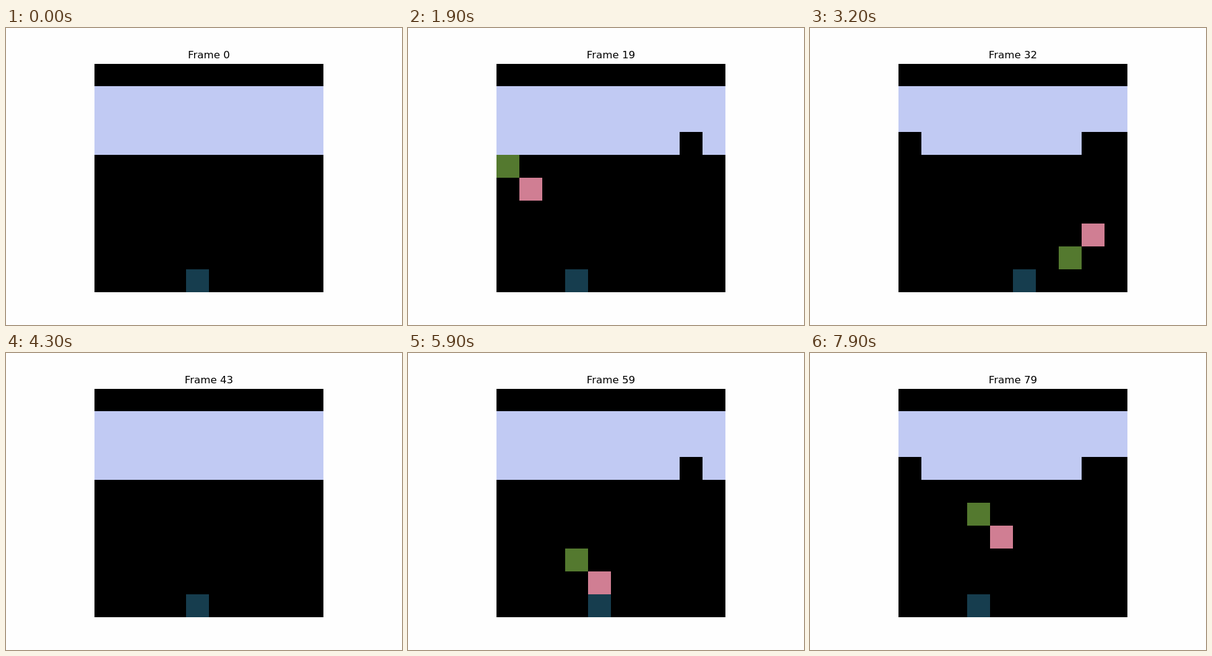
An HTML page that plays this animation: 640x480 px, repeating every 8000 ms.

```html
<!DOCTYPE html>
<html lang="en">
<head>
<meta charset="utf-8">
<title>Brick game</title>
<style>
  html, body { margin: 0; width: 100%; height: 100%; overflow: hidden; background: #fefefe; }
  svg { display: block; width: 640px; height: 480px; }
  text { font: 16.667px "DejaVu Sans", sans-serif; text-anchor: middle; }
</style>
</head>
<body>
<svg viewBox="0 0 640 480" shape-rendering="crispEdges">
  <text id="title" x="328" y="49">Frame 0</text>
  <rect x="143" y="58" width="370" height="369"/>
  <g id="board"></g>
</svg>
<script>
  const SIZE = 10, CELL = 37, LEFT = 143, TOP = 57;
  const STEP_MS = 100, FRAMES = 80;
  const COLORS = { paddle: '#163d4e', ball: '#54792f', trail: '#d07e93', brick: '#c1caf3' };
  // Paddle column at each step of a round.
  const PADDLE = '4444556665555444443333334432233456543333333';
  const title = document.getElementById('title');
  const board = document.getElementById('board');

  function playRound() {
    const bricks = new Set();
    for (let i = SIZE; i < 4 * SIZE; i++) bricks.add(i);
    let x = 0, y = 3, dx = 1, dy = 1;
    const states = [{ paddle: +PADDLE[0], ball: [x, y], trail: [x, y], bricks: [...bricks] }];

    for (let step = 1; step < PADDLE.length; step++) {
      const paddle = +PADDLE[step], trail = [x, y];
      let nx = x + dx, ny = y + dy;
      if (nx < 0 || nx >= SIZE) {
        nx = x;
        dx = -dx;
      }
      if (bricks.delete(ny * SIZE + nx)) {
        ny = y - dy;
        dy = -dy;
      } else if (ny === SIZE - 1 && nx === paddle) {
        ny = y;
        dy = -dy;
      }
      x = nx;
      y = ny;
      states.push({ paddle, ball: [x, y], trail, bricks: [...bricks] });
    }
    return states;
  }

  function cell(x, y, color) {
    return `<rect x="${LEFT + x * CELL}" y="${TOP + y * CELL}" width="${CELL}" height="${CELL}" fill="${color}"/>`;
  }

  const round = playRound();
  let shown = -1;

  function draw(frame) {
    const s = round[frame % round.length];
    title.textContent = 'Frame ' + frame;
    board.innerHTML =
      cell(s.paddle, SIZE - 1, COLORS.paddle) +
      cell(...s.ball, COLORS.ball) +
      cell(...s.trail, COLORS.trail) +
      s.bricks.map(i => cell(i % SIZE, Math.floor(i / SIZE), COLORS.brick)).join('');
  }

  const start = performance.now();
  function tick() {
    const frame = Math.floor((performance.now() - start) / STEP_MS) % FRAMES;
    if (frame !== shown) draw(shown = frame);
    requestAnimationFrame(tick);
  }
  tick();
</script>
</body>
</html>
```
